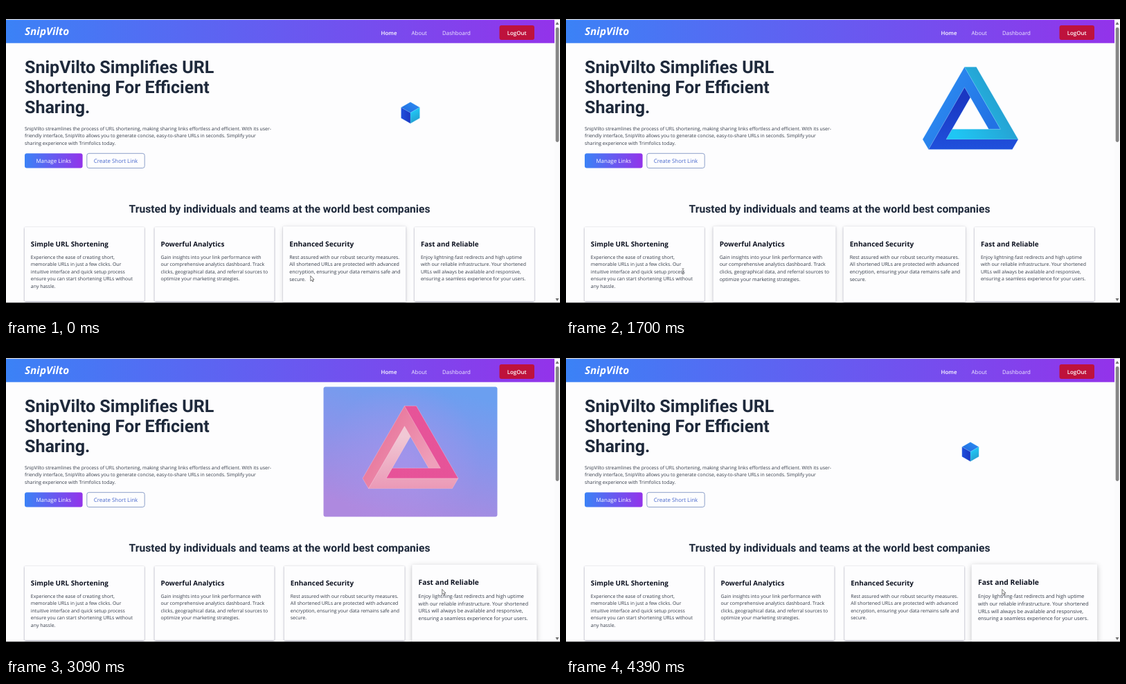
An HTML page with a canvas for the animation above (4.42 s loop, 800 by 450 pixels).

```html
<!DOCTYPE html>
<html lang="en">
<head>
<meta charset="utf-8">
<title>SnipVilto</title>
<style>
html, body { margin: 0; width: 100%; height: 100%; overflow: hidden; background: #000; }
svg, canvas { position: absolute; left: 0; top: 0; width: 800px; height: 450px; }
text { font-family: "Open Sans", "Noto Sans", sans-serif; text-rendering: geometricPrecision; white-space: pre; }
.head { font-family: Roboto, Arial, sans-serif; font-weight: 700; fill: #1e293b; }
.body { font-size: 6.93px; fill: #343b48; }
.title { font-size: 9.87px; font-weight: 700; fill: #0d1220; }
.ui { font-size: 7.95px; }
</style>
</head>
<body>
<svg id="page" viewBox="0 0 800 450">
  <defs>
    <linearGradient id="brand"><stop stop-color="#3b82f6"/><stop offset="1" stop-color="#9333ea"/></linearGradient>
    <filter id="tight" x="-10%" y="-10%" width="120%" height="120%"><feGaussianBlur stdDeviation="1"/></filter>
    <filter id="soft" x="-20%" y="-20%" width="140%" height="140%"><feGaussianBlur stdDeviation="4"/></filter>
  </defs>
  <rect y="19" width="800" height="411" fill="#fdfdfe"/>
  <rect y="20" width="792" height="33.7" fill="url(#brand)"/>
  <text x="27" y="42" font-size="15.3" font-weight="700" font-style="italic" fill="#fff">SnipVilto</text>
  <g class="ui">
    <text x="541.5" y="41.6" font-weight="600" fill="#fff">Home</text>
    <text x="585.5" y="41.6" font-weight="500" fill="#f0eeff">About</text>
    <text x="630" y="41.6" font-weight="500" fill="#f0eeff">Dashboard</text>
    <rect x="712.5" y="28" width="50.5" height="21" rx="3" fill="#be123c"/>
    <text x="737.7" y="41.6" font-weight="600" fill="#fff" text-anchor="middle">LogOut</text>
    <rect x="27" y="213.3" width="83.6" height="21.2" rx="3" fill="url(#brand)"/>
    <text x="68.8" y="227.2" fill="#fff" text-anchor="middle">Manage Links</text>
    <rect x="116.8" y="213.3" width="83.4" height="21.2" rx="3" fill="#fdfdfe" stroke="#7189bd" stroke-width=".8"/>
    <text x="158.5" y="227.2" fill="#4566cc" text-anchor="middle">Create Short Link</text>
  </g>
  <g id="hero"></g>
  <text class="head" x="395" y="299.2" font-size="15.66" text-anchor="middle">Trusted by individuals and teams at the world best companies</text>
  <g id="cards"></g>
  <g id="cursor">
    <path id="arrow" d="M0 0V7.4L1.7 5.9L2.9 8.4L4.1 7.8L3 5.4H5.2Z" fill="#fff" stroke="#222" stroke-width=".6"/>
    <path id="beam" d="M-1.5 -4H-.4L0 -3.6L.4 -4H1.5M0 -3.6V3.6M-1.5 4H-.4L0 3.6L.4 4H1.5" fill="none" stroke="#333" stroke-width=".6"/>
  </g>
  <rect x="792" y="20" width="8" height="409" fill="#fbfbfc"/>
  <rect x="793.7" y="31" width="4.8" height="166" rx="2.4" fill="#868686"/>
  <path d="M793.5 27L796 23L798.5 27ZM793.5 423L796 427L798.5 423Z" fill="#707070"/>
  <path d="M0 0H800V19H0ZM0 429.3H800V450H0Z"/>
</svg>
<canvas id="art" width="800" height="450"></canvas>
<script>
const LOOP = 4420;
const $ = id => document.getElementById(id);
const clamp = v => Math.max(0, Math.min(1, v));
const ramp = (t, a, b) => clamp((t - a) / (b - a));
const smooth = (t, a, b) => { const x = ramp(t, a, b); return x * x * (3 - 2 * x); };

function add(parent, tag, attrs, text) {
  const el = document.createElementNS('http://www.w3.org/2000/svg', tag);
  for (const k in attrs) el.setAttribute(k, attrs[k]);
  if (text) el.textContent = text;
  parent.append(el);
  return el;
}
const lines = (parent, cls, x, y, step, rows, size) => rows.forEach((row, i) =>
  add(parent, 'text', { class: cls, x, y: y + i * step, ...(size && { 'font-size': size }) }, row));

lines($('hero'), 'head', 27, 97, 28.9,
  ['SnipVilto Simplifies URL', 'Shortening For Efficient', 'Sharing.'], 25.05);
lines($('hero'), 'body', 27, 179.5, 10.5, [
  'SnipVilto streamlines the process of URL shortening, making sharing links effortless and efficient. With its user-',
  'friendly interface, SnipVilto allows you to generate concise, easy-to-share URLs in seconds. Simplify your',
  'sharing experience with Trimfolics today.']);

// hover: [time, pointer over the card]
const cards = [
  { x: 26.8, title: 'Simple URL Shortening', hover: [[1690, 1], [2040, 0]], rows: [
    'Experience the ease of creating short,', 'memorable URLs in just a few clicks. Our',
    'intuitive interface and quick setup process', 'ensure you can start shortening URLs without', 'any hassle.'] },
  { x: 214.5, title: 'Powerful Analytics', hover: [[1540, 1], [1692, 0], [2050, 1], [2440, 0]], rows: [
    'Gain insights into your link performance with', 'our comprehensive analytics dashboard. Track',
    'clicks, geographical data, and referral sources to', 'optimize your marketing strategies.'] },
  { x: 402.2, title: 'Enhanced Security', hover: [[-150, 1], [1530, 0], [2460, 1], [2850, 0]], rows: [
    'Rest assured with our robust security measures.', 'All shortened URLs are protected with advanced',
    'encryption, ensuring your data remains safe and', 'secure.'] },
  { x: 589.9, title: 'Fast and Reliable', hover: [[2865, 1]], rows: [
    'Enjoy lightning-fast redirects and high uptime', 'with our reliable infrastructure. Your shortened',
    'URLs will always be available and responsive,', 'ensuring a seamless experience for your users.'] }
];
const CARD_W = 173, CARD_H = 107, CARD_Y = 320, FADE = 300;
for (const c of cards) {
  const box = { x: c.x, y: CARD_Y, width: CARD_W, height: CARD_H, rx: 1 };
  c.g = add($('cards'), 'g');
  c.soft = add(c.g, 'rect', { ...box, y: CARD_Y + 2, filter: 'url(#soft)' });
  c.tight = add(c.g, 'rect', { ...box, y: CARD_Y + .7, fill: '#0c0c30', filter: 'url(#tight)' });
  add(c.g, 'rect', { ...box, fill: '#fdfdfe' });
  add(c.g, 'text', { class: 'title', x: c.x + 9, y: 348.4 }, c.title);
  lines(c.g, 'body', c.x + 9, 366, 10.42, c.rows);
}

function hoverAt(c, t) {
  let v = 0, last = -1e4, goal = 0;
  const run = until => {
    const d = (until - last) / FADE;
    v = clamp(goal ? v + d : v - d);
    last = until;
  };
  for (const [at, on] of c.hover) {
    if (at > t) break;
    run(at);
    goal = on;
  }
  run(t);
  return v * v * (3 - 2 * v);
}

function drawCards(t) {
  for (const c of cards) {
    const v = hoverAt(c, t), cx = c.x + CARD_W / 2, cy = CARD_Y + CARD_H / 2 - .5;
    c.g.setAttribute('transform', `translate(${cx} ${cy}) scale(${1 + .05 * v}) translate(${-cx} ${-cy})`);
    c.soft.setAttribute('opacity', .22 * v);
    c.tight.setAttribute('opacity', .45 - .37 * v);
  }
}

const path = [[0, 439.8, 390.5], [1490, 439.8, 390.5], [1690, 169, 384], [1900, 167, 383], [2045, 207, 379],
  [2180, 358.5, 368], [2400, 374, 367], [2450, 395, 366], [2610, 530, 359], [2780, 562, 358],
  [2865, 591, 356], [3000, 629.8, 353.5], [LOOP, 629.8, 353.5]];
function drawCursor(t) {
  const i = path.findIndex(p => p[0] > t), a = path[i - 1], b = path[i];
  const f = ramp(t, a[0], b[0]);
  $('cursor').setAttribute('transform', `translate(${a[1] + (b[1] - a[1]) * f} ${a[2] + (b[2] - a[2]) * f})`);
  const arrow = t < 1500 || t > 2860;
  $('arrow').setAttribute('visibility', arrow ? 'visible' : 'hidden');
  $('beam').setAttribute('visibility', arrow ? 'hidden' : 'visible');
}

// Impossible triangle: three L-shaped faces bounded by parallel lines per side
const ctx = $('art').getContext('2d');
const C30 = Math.sqrt(3) / 2;
const normals = [[-C30, -.5], [C30, -.5], [0, 1]];
// Per face (left, right, bottom): outer strip colour, inner strip colour
const blue = [['#2a85ee', '#2272e4'], ['#25a4d4', '#1fc6f4'], ['#1f50dc', '#1a37c2']];
const rose = [['#db7590', '#e6b0c0'], ['#dc90aa', '#e8a4ba'], ['#d4608c', '#e2cdd8']];
const hot = [['#ee7fa6', '#f29ab8'], ['#ea3d92', '#e6348c'], ['#f3aec6', '#f6c6d3']];

function meet(i, a, j, b) {
  const p = normals[i % 3], q = normals[j % 3];
  const s = (4 * a + 2 * b) / 3, r = (2 * a + 4 * b) / 3;
  return [s * p[0] + r * q[0], s * p[1] + r * q[1]];
}

function drawShape({ unit, mid, twist, turn, cy }, colors, edge) {
  const h = unit * C30, out = mid + h, hole = Math.max(0, mid - h), seam = mid + twist * h;
  ctx.save();
  ctx.translate(584, cy);
  ctx.rotate(turn);
  ctx.lineWidth = .6;
  ctx.lineJoin = 'round';
  ctx.strokeStyle = edge;
  for (let k = 0; k < 3; k++) {
    const n = k + 1, p = k + 2;
    const pts = [meet(p, seam, k, out), meet(k, out, n, seam), meet(n, seam, p, hole),
      meet(n, hole, p, hole), meet(k, seam, n, hole), meet(p, out, k, seam)];
    const [nx, ny] = normals[k];
    const g = ctx.createLinearGradient(nx * out, ny * out, ...pts[3]);
    g.addColorStop(0, colors[k][0]);
    g.addColorStop(1, colors[k][1]);
    ctx.fillStyle = g;
    ctx.beginPath();
    pts.forEach(q => ctx.lineTo(...q));
    ctx.closePath();
    ctx.fill();
    ctx.stroke();
  }
  ctx.restore();
}

function drawBackdrop() {
  const g = ctx.createLinearGradient(620, 60, 570, 250);
  g.addColorStop(0, '#6b9ff0');
  g.addColorStop(.45, '#8795eb');
  g.addColorStop(1, '#ae89df');
  ctx.beginPath();
  ctx.roundRect(458.5, 60.5, 251, 188, 3);
  ctx.fillStyle = g;
  ctx.fill();
  const glow = ctx.createRadialGradient(575, 165, 10, 575, 165, 110);
  glow.addColorStop(0, 'rgba(178,148,236,.5)');
  glow.addColorStop(1, 'rgba(178,148,236,0)');
  ctx.fillStyle = glow;
  ctx.fill();
}

function drawArt(t) {
  ctx.clearRect(0, 0, 800, 450);
  const popping = t > 4110, s = popping ? t - LOOP : t;
  const mid = 30 * smooth(s, 100, 1660);
  const shape = {
    unit: Math.max(0, Math.min(17, 15.5 + .05 * s)),
    mid,
    twist: .78 * smooth(s, 3100, 3800),
    turn: (1 - smooth(s, 40, 520)) * Math.PI / 2,
    cy: 154.5 + Math.max(0, mid - 12.4) * .477
  };
  if (popping || t < 2060) drawShape(shape, blue, 'rgba(150,215,255,.35)');
  if (popping || t < 1750) return;
  const x = ramp(t, 3441, 4041), radius = 157 * (1 - x * x);
  if (radius <= 0) return;
  ctx.save();
  ctx.globalAlpha = smooth(t, 1750, 2050);
  ctx.beginPath();
  ctx.arc(584, 154.5, radius, 0, 7);
  ctx.clip();
  drawBackdrop();
  drawShape(shape, rose, 'rgba(255,215,225,.4)');
  ctx.globalAlpha *= smooth(t, 2300, 3500);
  drawShape(shape, hot, 'rgba(255,215,225,.4)');
  ctx.restore();
}

const start = performance.now();
function frame() {
  const t = (performance.now() - start) % LOOP;
  drawCards(t);
  drawCursor(t);
  drawArt(t);
  requestAnimationFrame(frame);
}
frame();
</script>
</body>
</html>
```
